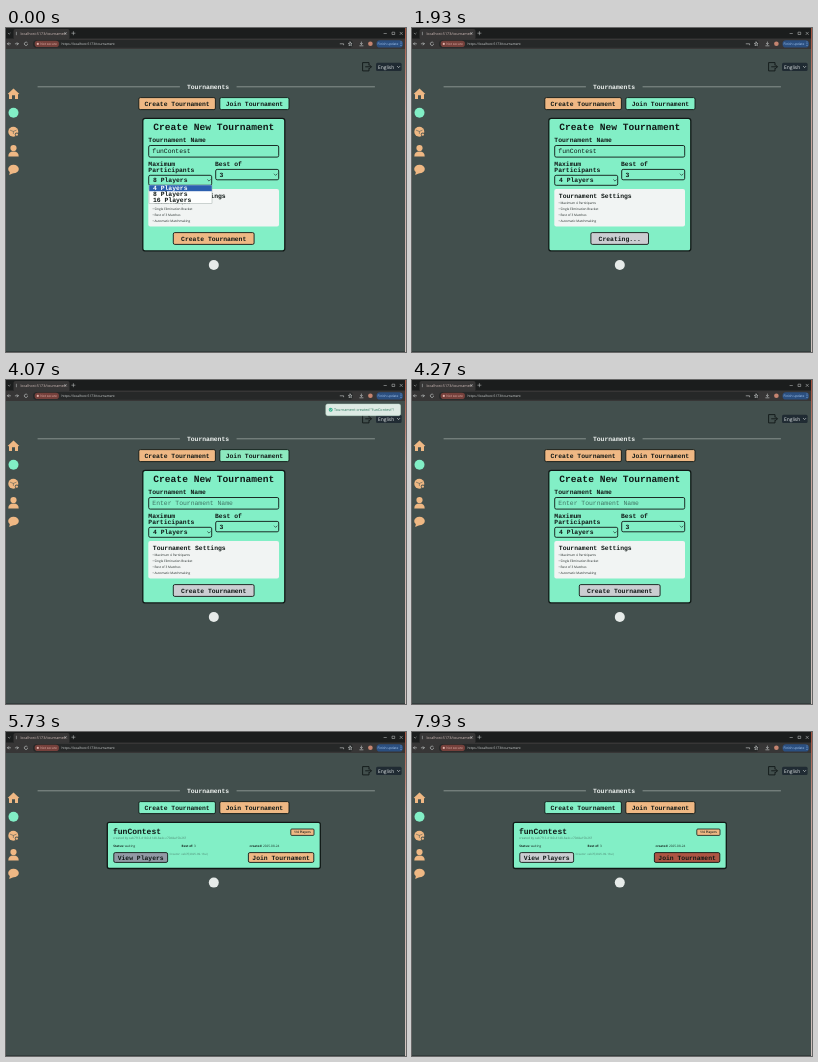
Animation of 400 by 324 pixels, one loop 8 s. Source, as an HTML page:

```html
<!DOCTYPE html>
<html lang="en">
<head>
<meta charset="utf-8">
<title>Tournaments</title>
<style>
html, body { margin: 0; width: 100%; height: 100%; overflow: hidden; background: #424f4d; }
svg { display: block; width: 100vw; height: 100vh; }
text { text-rendering: geometricPrecision; white-space: pre; }
.mono { font-family: "Liberation Mono", "DejaVu Sans Mono", monospace; font-weight: 700; }
.thin { font-weight: 400; }
.sans { font-family: "Open Sans", "Noto Sans", sans-serif; }
.line { fill: none; stroke-linecap: round; stroke-linejoin: round; }
</style>
</head>
<body>
<svg id="stage" viewBox="0 0 400 324" xmlns="http://www.w3.org/2000/svg"></svg>
<script>
const LOOP = 8000;
const TEAL = '#82efc6', ORANGE = '#efb884', GRAY = '#cbcdd1', SLATE = '#9299a5', RED = '#ad5443';
const INK = '#101816', NAME = 'funContest';

const rect = (x, y, w, h, fill, o = '') => `<rect x="${x}" y="${y}" width="${w}" height="${h}" fill="${fill}" ${o}/>`;
const box = (x, y, w, h, fill, o = '', sw = 0.9, r = 1.5) =>
  rect(x, y, w, h, fill, `rx="${r}" stroke="${INK}" stroke-width="${sw}" ${o}`);
const text = (cls, x, y, size, str, o = '') =>
  `<text class="${cls}" x="${x}" y="${y}" font-size="${size}" ${o}>${str}</text>`;
const mono = (x, y, str, size = 6.4, o = '') => text('mono', x, y, size, str, `fill="${INK}" ${o}`);
const sans = (x, y, str, size, fill, o = '') => text('sans', x, y, size, str, `fill="${fill}" ${o}`);
const path = (d, stroke, w = 0.8) => `<path class="line" d="${d}" stroke="${stroke}" stroke-width="${w}"/>`;
const dot = (x, y, r, fill, o = '') => `<circle cx="${x}" cy="${y}" r="${r}" fill="${fill}" ${o}/>`;
const group = (id, body) => `<g id="${id}">${body}</g>`;
const mid = 'text-anchor="middle"';
const button = (id, x, y, w, h, fill, label) =>
  box(x, y, w, h, fill, `id="${id}"`) + mono(x + w / 2, y + h / 2 + 2, label, 6.4, `${mid} id="${id}Label"`);
const chevron = (x, y) => path(`M${x - 1.4} ${y - 0.7}l1.4 1.4l1.4 -1.4`, INK, 0.6);

function chrome() {
  const pale = '#c9cdcd';
  return rect(0, 0, 400, 11, '#1b1d1d') + rect(0, 10.5, 400, 10.5, '#373636') +
    rect(7.5, 1, 56, 10.5, '#373636', 'rx="2"') +
    sans(14.4, 6.9, 'localhost:5173/tournamen', 3.7, '#cfbcb8') +
    path('M2.2 5.2l1 1l1 -1M10.4 4.2v2.6M58.6 4.4l1.8 1.8m0 -1.8l-1.8 1.8M65.8 5.2h3.2m-1.6 -1.6v3.2', pale, 0.5) +
    path('M378 5.5h2.4M386.4 4.2h2.3v2.3h-2.3zM394 4.2l2.4 2.4m0 -2.4l-2.4 2.4', pale, 0.5) +
    path('M4.5 15.8h-3m1.2 -1.2l-1.2 1.2l1.2 1.2M9.3 15.8h3m-1.2 -1.2l1.2 1.2l-1.2 1.2M21.4 14.8a1.7 1.7 0 1 0 0.2 1.6', pale, 0.6) +
    rect(27, 12, 320, 7.8, '#262828', 'rx="3.9"') +
    rect(28.6, 12.8, 24.4, 6.2, '#75403b', 'rx="3.1"') +
    dot(31.8, 15.9, 1.1, '#e3b3ac') + sans(34.2, 17.1, 'Not secure', 3.3, '#e3b3ac') +
    sans(55.6, 17.2, 'https://localhost:5173/tournament', 3.3, '#d2d6d6') +
    path('M334.2 15.8h3.4v1M344.2 14l0.6 1.3l1.3 0.1l-1 0.9l0.3 1.4l-1.2 -0.7l-1.2 0.7l0.3 -1.4l-1 -0.9l1.3 -0.1z', pale, 0.6) +
    path('M355.4 14v2.4m-1 -1l1 1l1 -1M353.8 17.8h3.2', pale, 0.6) +
    dot(364.4, 15.8, 2.3, '#c58470') +
    rect(370.5, 12.2, 26.5, 7.3, '#2b4f80', 'rx="3.6"') +
    sans(382, 17, 'Finish update', 3.3, '#a9cbf3', mid) +
    path('M395 14v0.01M395 15.8v0.01M395 17.6v0.01', '#a9cbf3', 0.8);
}

function sidebar() {
  return `<g fill="${ORANGE}">
    <path d="M1.6 66L7.5 60.4L13.4 66L12 66.2V71H9V67.3H6V71H3V66.2Z"/>
    <circle cx="7.3" cy="103.8" r="5"/>
    <circle cx="7.5" cy="120" r="3.1"/>
    <path d="M2.3 128.6q0 -5 5.2 -5q5.2 0 5.2 5z"/>
    <ellipse cx="7.5" cy="141" rx="5.3" ry="4.3"/>
    <path d="M4 143.5l-0.8 3.6l4.5 -2.2z"/></g>` +
    dot(7.5, 84.8, 5, TEAL) +
    path('M4.4 102.4q3 2.3 5.8 0M7.4 103.5v2', '#59605a', 0.6) +
    dot(10.8, 106.6, 2, '#424f4d') + dot(10.8, 106.6, 1.2, ORANGE);
}

function header() {
  return path('M363 37v-2.4h-6.4v8.3h6.4v-2.4M359.6 38.8h5.6m-1.7 -1.9l1.9 1.9l-1.9 1.9', '#111818', 0.9) +
    rect(370, 34.8, 25.6, 8.2, '#202b33', 'rx="1.5"') +
    sans(372, 40.7, 'English', 4.9, '#e4e9e9') +
    path('M391.4 38.4l1.2 1.2l1.2 -1.2', '#e4e9e9', 0.6) +
    path('M32 58.8H173.5M231 58.8H368.5', '#a5aeab', 0.7) +
    mono(202, 60.8, 'Tournaments', 6.4, `${mid} style="fill:#eef2f0"`) +
    button('createTab', 132.8, 69.6, 76.6, 12, ORANGE, 'Create Tournament') +
    button('joinTab', 213.8, 69.6, 69.2, 12, TEAL, 'Join Tournament');
}

function form() {
  const rules = ['Single Elimination Bracket', 'Best of 3 Matches', 'Automatic Matchmaking'];
  const rule = (str, i, o = '') => sans(146.5, 176.2 + i * 5.85, '• ' + str, 3.15, '#1f2725', o);
  const settings = rect(142.3, 161, 130.7, 37.5, '#f1f4f3', 'rx="2"') +
    mono(146.8, 169.8, 'Tournament Settings') +
    rule('', 0, 'id="limit"') + rules.map((s, i) => rule(s, i + 1)).join('');
  const menu = rect(143, 157, 63, 18.3, '#fdfefd', 'stroke="#8b9b96" stroke-width=".4"') +
    rect(143.2, 157.2, 62.6, 6, '#2b5fae') +
    ['4', '8', '16'].map((n, i) =>
      mono(147, 162.2 + i * 5.7, n + ' Players', 6.4, i ? '' : 'style="fill:#fff"')).join('');
  return box(136.8, 90.3, 142, 132.6, TEAL, '', 1.3, 2.5) +
    mono(207.8, 102.3, 'Create New Tournament', 9.6, mid) +
    mono(142.3, 113.8, 'Tournament Name') +
    box(142.7, 117.5, 130, 11.6, TEAL) +
    text('mono thin', 146.3, 125.3, 6.4, '', 'id="field"') +
    mono(142.3, 138, 'Maximum') + mono(142.3, 144, 'Participants') + mono(209, 138, 'Best of') +
    box(142.7, 147.3, 63, 10, TEAL) + mono(147, 154.3, '', 6.4, 'id="players"') + chevron(203, 152.4) +
    box(209.7, 141.4, 63, 10.4, TEAL) + mono(213.5, 148.6, '3') + chevron(269.6, 146.7) +
    settings + group('menu', menu) +
    button('submit', 167.3, 204.6, 80.8, 11.8, ORANGE, 'Create Tournament');
}

function card() {
  const pair = (x, label, value) =>
    sans(x, 115.2, `<tspan font-weight="700">${label}</tspan> ${value}`, 3.1, '#182822');
  return box(101.3, 90.3, 213, 46.2, TEAL, '', 1.3, 2) +
    mono(107, 101.8, NAME, 8) +
    sans(107, 106.5, 'created by cab7f13-d1b0-4148-8a4c-c70d4a15b26f', 3.1, '#4f8873') +
    box(284.8, 97, 23.2, 6.4, ORANGE, '', 0.8, 1) +
    sans(296.4, 101.4, '1/4 Players', 3.2, INK, mid + ' font-weight="600"') +
    pair(107.2, 'Status:', 'waiting') + pair(175.6, 'Best of:', '3') + pair(243.6, 'created:', '2025-08-24') +
    button('view', 107.8, 120.6, 53.8, 9.8, GRAY, 'View Players') +
    sans(163.5, 123, 'Creator: cab7f(2025-09-13ui)', 2.9, '#4f8873') +
    button('join', 242.4, 120.6, 65.4, 9.8, ORANGE, 'Join Tournament');
}

function toast() {
  return rect(319.8, 25.2, 74.8, 11.6, '#eefbf4', 'rx="1.8" stroke="#c8ebda" stroke-width=".5"') +
    dot(324.7, 31, 2, '#39bd96') +
    path('M323.8 31l0.7 0.7l1.2 -1.4', '#fff', 0.5) +
    sans(328, 32.3, `Tournament created "${NAME}"!`, 3.75, '#2b7f62');
}

document.getElementById('stage').innerHTML =
  '<clipPath id="page"><rect y="21" width="400" height="303"/></clipPath>' +
  '<linearGradient id="edge" x2="0" y2="1"><stop stop-color="#a4533f"/><stop offset=".25" stop-color="#c9a49b"/><stop offset="1" stop-color="#cfc3bf"/></linearGradient>' +
  rect(0, 0, 400, 324, '#424f4d') + chrome() + sidebar() + header() +
  group('form', form()) + group('card', card()) +
  dot(207.8, 237, 5, '#e6ebe9', 'id="mark"') +
  `<g clip-path="url(#page)">${group('toast', toast())}</g>` +
  rect(0, 323.4, 400, 0.6, '#2b3231') + rect(399, 0, 1, 324, 'url(#edge)');

const el = {};
document.querySelectorAll('[id]').forEach(n => el[n.id] = n);

const ramp = (t, a, b) => Math.min(1, Math.max(0, (t - a) / (b - a)));
const easeOut = p => 1 - (1 - p) ** 3;
const show = (node, on) => node.setAttribute('display', on ? 'inline' : 'none');
const fill = (node, color) => node.setAttribute('fill', color);
const put = (node, str) => { if (node.textContent !== str) node.textContent = str; };

function mix(a, b, p) {
  const part = (c, i) => parseInt(c.slice(i, i + 2), 16);
  return `rgb(${[1, 3, 5].map(i => Math.round(part(a, i) + (part(b, i) - part(a, i)) * p)).join()})`;
}

function drawForm(t) {
  const picked = t >= 270, busy = t >= 1470 && t < 2130, created = t >= 2130;
  const count = picked ? 4 : 8;
  show(el.menu, !picked);
  put(el.players, count + ' Players');
  put(el.limit, `• Maximum ${count} Participants`);
  put(el.field, created ? 'Enter Tournament Name' : NAME);
  fill(el.field, created ? '#3f7564' : INK);
  put(el.submitLabel, busy ? 'Creating...' : 'Create Tournament');
  el.submit.setAttribute('x', busy ? 178.9 : 167.3);
  el.submit.setAttribute('width', busy ? 57.6 : 80.8);
  fill(el.submit, t < 1470 ? mix(ORANGE, RED, ramp(t, 900, 1000)) : GRAY);
}

function drawToast(t) {
  const shown = easeOut(ramp(t, 2130, 2560)) * (1 - ramp(t, 4050, 4270));
  show(el.toast, shown > 0);
  el.toast.setAttribute('opacity', shown);
  el.toast.setAttribute('transform', `translate(0 ${-12 * (1 - shown)})`);
}

function draw(t) {
  const list = t >= 4670;
  show(el.form, !list);
  show(el.card, list);
  el.mark.setAttribute('cy', list ? 150.6 : 237);
  fill(el.createTab, list ? TEAL : ORANGE);
  fill(el.joinTab, mix(TEAL, ORANGE, ramp(t, 4050, 4250)));
  fill(el.view, mix(GRAY, SLATE, ramp(t, 5310, 5650) * (1 - ramp(t, 6050, 6200))));
  fill(el.join, mix(ORANGE, RED, ramp(t, 6130, 6500)));
  drawForm(t);
  drawToast(t);
}

const start = performance.now();
function tick() {
  draw((performance.now() - start) % LOOP);
  requestAnimationFrame(tick);
}
tick();
</script>
</body>
</html>
```
